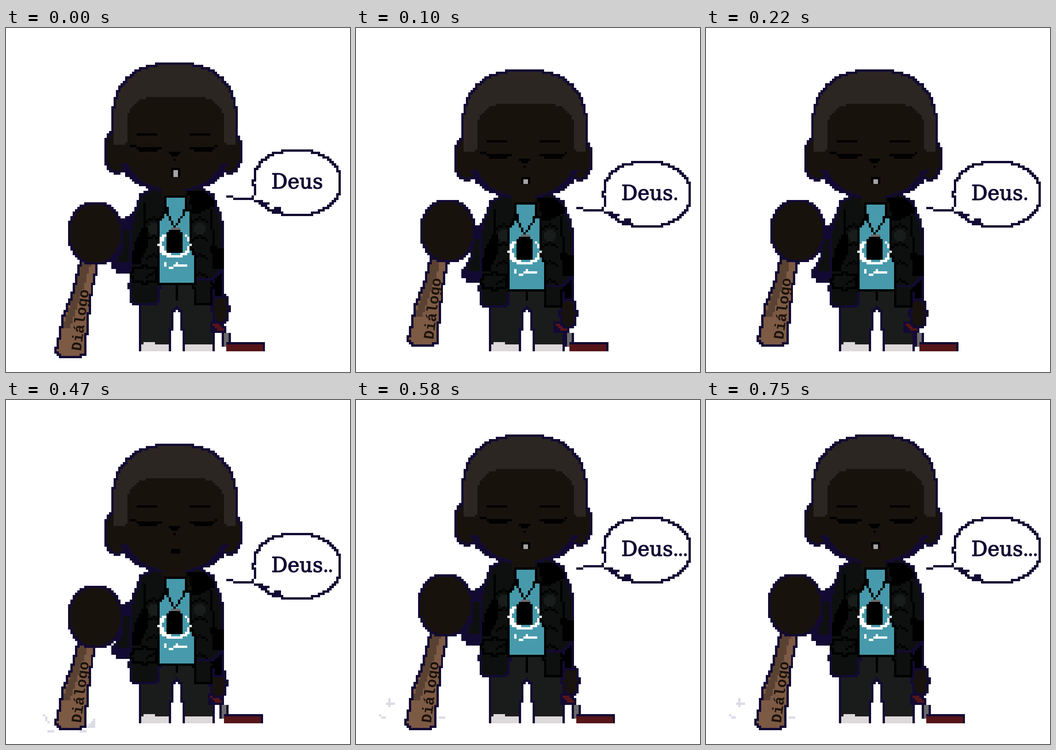
An HTML page with a canvas for the animation above (0.86 s loop, 748 px wide and 748 px high).

```html
<!DOCTYPE html>
<html lang="pt">
<head>
<meta charset="utf-8">
<title>Deus...</title>
<style>
  html, body { margin: 0; width: 100%; height: 100%; overflow: hidden; background: #fff; }
  canvas, svg { position: absolute; left: 0; top: 0; width: 100%; height: 100%; }
  canvas { image-rendering: pixelated; }
  #speech { font: 44px "DejaVu Serif", "Noto Serif", serif; fill: #130a33; stroke: #130a33; stroke-width: 1.4px; }
  #dots { font: 42px "Liberation Serif", serif; }
  #carving { font: bold 32px "Liberation Mono", monospace; fill: #1c130d; }
</style>
</head>
<body>
<canvas width="150" height="150"></canvas>
<svg viewBox="0 0 748 748">
  <text id="carving">Diálogo</text>
  <text id="speech" x="577">Deus<tspan id="dots" x="690"></tspan></text>
</svg>
<script>
const ctx = document.querySelector('canvas').getContext('2d');
const [carving, speech, dots] = ['carving', 'speech', 'dots'].map(id => document.getElementById(id));

const NAVY = '#130a33', SKIN = '#18120d', HAIR = '#2c2622', COAT = '#0d100f', BLACK = '#000',
  TEAL = '#479aab', CLOTH = '#1a1c1c', SHOE = '#ddd8da', WOOD = '#7d5a44', SHADE = '#5a4233',
  RED = '#561519', GREY = '#6b6a6c', SPLASH = '#dcdce8', GLEAM = '#181c1b', WHITE = '#fff';

// Offsets from the rest pose, in art pixels on a 150 x 150 grid.
const rest = { head: 0, brow: 0, face: 0, body: 0, hem: 0, arm: 0, fist: [0, 0], bat: [0, 0],
  hand: [0, 0], blade: 0, bubble: 0, tail: 0 };
const poses = [
  { ...rest, until: 100, lips: 61, teeth: 3 },
  { ...rest, until: 300, lips: 65, teeth: 2, head: 3, brow: 3, face: 3, body: 3, hem: 1, arm: 4,
    fist: [1, -1], bat: [1, -5], hand: [-1, 2], blade: -3, bubble: 5, tail: 5 },
  { ...rest, until: 580, lips: 65, teeth: 0, head: 4, face: 1, body: 4, hem: 3, arm: 6,
    fist: [0, 5], hand: [-1, 1], blade: -1, bubble: 5, tail: 5 },
  { ...rest, until: 860, lips: 62, teeth: 2, bubble: -2 }
];

const move = (x, y) => ctx.setTransform(1, 0, 0, 1, x, y);

function box(color, x, y, w, h = 1) {
  ctx.fillStyle = color;
  ctx.fillRect(x, y, w, h);
}

// Fills rows of [y, from, to], with an optional one-pixel outline around them.
function fillRows(rows, fill, edge) {
  if (edge) for (const [y, a, b] of rows) box(edge, a - 1, y - 1, b - a + 3, 3);
  for (const [y, a, b] of rows) box(fill, a, y, b - a + 1);
}

// Superellipse; n = 2 is round, larger n is squarer.
function oval(fill, edge, cx, cy, rx, ry, n = 2, top = 0, bottom = 150) {
  const rows = [];
  for (let y = Math.max(top, Math.ceil(cy - ry)); y <= Math.min(bottom, cy + ry); y++) {
    const w = rx * (1 - Math.abs((y - cy) / ry) ** n) ** (1 / n);
    rows.push([y, Math.ceil(cx - w), Math.floor(cx + w)]);
  }
  fillRows(rows.filter(r => r[2] >= r[1]), fill, edge);
}

function parse(text) {
  return text.split(', ').map(pair => pair.split(' ').map(Number));
}

function poly(fill, edge, p) {
  if (typeof p == 'string') p = parse(p);
  const ys = p.map(q => q[1]), rows = [];
  for (let y = Math.min(...ys); y < Math.max(...ys); y++) {
    const cuts = [];
    p.forEach(([a, b], i) => {
      const [c, d] = p[(i + 1) % p.length];
      if ((b <= y) != (d <= y)) cuts.push(a + (y - b) * (c - a) / (d - b));
    });
    cuts.sort((m, n) => m - n);
    for (let i = 0; i < cuts.length; i += 2) rows.push([y, Math.ceil(cuts[i]), Math.floor(cuts[i + 1])]);
  }
  fillRows(rows, fill, edge);
}

// Polygon given by its right half, as offsets from the axis cx.
function mirrored(fill, edge, cx, text) {
  const half = parse(text);
  poly(fill, edge, [...half.map(([x, y]) => [cx + x, y]), ...half.reverse().map(([x, y]) => [cx - x, y])]);
}

function line(color, text) {
  parse(text).reduce(([x, y], [u, v]) => {
    const n = Math.max(Math.abs(u - x), Math.abs(v - y));
    for (let i = 0; i <= n; i++) box(color, Math.round(x + (u - x) * i / n), Math.round(y + (v - y) * i / n), 1);
    return [u, v];
  });
}

function legs() {
  move(0, 0);
  mirrored(CLOTH, NAVY, 74, '0 108, 15 108, 15 141, 4 141, 3 130, 2 122, 0 120');
  box(BLACK, 74, 111, 1, 8);
  for (const x of [59, 78]) box(SHOE, x, 138, 12, 3);
  box(SHOE, 60, 137, 5);
  box(WHITE, 50, 141, 50);
}

function weapon(p) {
  move(p.blade, 0);
  box(NAVY, 89, 128, 3, 5);
  poly(RED, NAVY, '90 129, 92 129, 95 132, 92 132');
  box(NAVY, 94, 133, 4, 6);
  box(GREY, 95, 133, 2, 6);
  box(NAVY, 96, 137, 17, 4);
  box(RED, 96, 138, 16, 3);
  move(...p.hand);
  oval(SKIN, NAVY, 93, 122, 3, 5.5);
}

function coat(p) {
  move(0, p.hem);
  poly(BLACK, NAVY, '89 100, 93 100, 93 117, 91 117');
  oval(COAT, NAVY, 60, 112, 6, 7.5, 5);
  oval(COAT, BLACK, 85.5, 112, 3.5, 8, 5);

  move(0, p.arm);
  poly(COAT, NAVY, '57 82, 51 84, 50 97, 47 103, 55 105, 58 103');
  poly(NAVY, NAVY, '47 102, 55 103, 55 106, 49 105');
  poly(NAVY, NAVY, '51 84, 55 82, 54 85, 51 87');

  move(0, p.body);
  mirrored(COAT, NAVY, 74, '0 70, 10 70, 15 73, 18 81, 19 85, 19 104, 15 109, 0 109');
  oval(COAT, BLACK, 60, 107, 5, 3, 3);
  poly(BLACK, BLACK, '60 88, 60 94, 57 101, 55 102, 57 94');
  poly(BLACK, BLACK, '80 71, 85 72, 89 76, 82 80');
  poly(BLACK, BLACK, '90 96, 93 97, 93 104, 91 104');
  // Quilted seams on both sides.
  for (const x of [64, 84])
    for (let y = 83; y < 109; y += 8) {
      if (y < 90) oval(GLEAM, null, x, y + 4, 2.5, 2.5);
      line(BLACK, `${x - 3} ${y + 1}, ${x} ${y - 1}, ${x + 3} ${y + 1}`);
    }
  line(BLACK, '60 76, 60 88');
  line(BLACK, '89 79, 90 96');
}

function shirt(p) {
  move(0, p.body);
  box(SKIN, 68, 67, 10, 7);
  poly(TEAL, BLACK, '70 74, 77 74, 77 80, 79 80, 80 97, 81 99, 81 111, 67 111, 67 84, 70 79');
  line(BLACK, '69 75, 70 81, 73 86, 77 81, 78 75');
  oval(WHITE, null, 73, 94, 7, 5.7, 2.2);
  oval(TEAL, null, 73.5, 93.5, 5.6, 4.8, 2.2);
  box(GREY, 72, 87, 4);
  box(BLACK, 70, 89, 7, 9);
  box(BLACK, 71, 88, 5);
  box(WHITE, 69, 102, 1, 2);
  box(WHITE, 74, 103, 5);
  line(WHITE, '71 104, 72 104, 74 102');
}

function head(p) {
  const skull = (fill, edge, top, bottom) => oval(fill, edge, 73, 42.5, 26.5, 27, 2.5, top, bottom);
  move(0, p.head);
  skull(NAVY, NAVY);
  oval(SKIN, NAVY, 48, 53.5, 5, 8.5);
  oval(SKIN, NAVY, 97, 53.5, 4.5, 8.5);
  skull(HAIR, null, 0, 50);
  skull(SKIN, null, 51, 58);
  skull(NAVY, null, 59);
  oval(SKIN, null, 73.5, 50, 21.5, 20.7, 4, 0, 58);
  oval(SKIN, null, 73, 50, 22, 19.7, 2.3, 57);
  box(SKIN, 68, 69, 10, 2);

  move(0, p.brow);
  for (const x of [57, 80]) box(BLACK, x, 46, 9);
  move(0, p.face);
  line(BLACK, '54 51, 56 51, 57 52, 67 52');
  line(BLACK, '80 52, 90 52, 91 51');
  for (const x of [58, 82]) box(BLACK, x, 53, 8);
  box(BLACK, 71, 54, 5);
  box(BLACK, 72, 55, 3);
  box(BLACK, 73, 57, 1);
  move(0, 0);
  box(BLACK, 72, p.lips, 4, p.teeth + (p.teeth ? 1 : 2));
  box('#a5a3a3', 73, p.lips + 1, 2, p.teeth);
}

function bat(p) {
  const [x, y] = p.bat;
  move(x, y);
  poly(WOOD, NAVY, '33 100, 38 100, 38 106, 36 115, 33 141, 30 143, 24 143, 22 140, 25 126, 29 116');
  poly(SHADE, null, '33 100, 36 103, 34 110, 27 131, 24 131, 29 116');
  carving.setAttribute('transform', `translate(${163 + 5 * x} ${703 + 5 * y}) rotate(-82.7)`);
  move(...p.fist);
  oval(SKIN, NAVY, 38.5, 89, 11, 12.5, 2.2);
}

function splash(k) {
  move(0, 0);
  if (k == 2) {
    line(SPLASH, '16 137, 18 140');
    for (const x of [18, 32]) box(SPLASH, x, 144, 3);
    poly(SPLASH, null, '38 139, 38 142, 36 143, 35 142');
  }
  if (k == 3) {
    box(SPLASH, 14, 130, 1, 4);
    box(SPLASH, 13, 132, 4);
    line(SPLASH, '10 137, 12 138');
    box(SPLASH, 36, 138, 3);
  }
}

function bubble(p) {
  move(0, p.bubble);
  oval(WHITE, NAVY, 126.3, 67, 18.3, 13.5, 2.2);
  poly(WHITE, null, '109 70, 106 74, 112 76, 114 75');
  line(NAVY, '108 70, 108 72, 106 74, 110 75, 114 76');
  box(NAVY, 117, 78, 3, 2);
  move(0, p.tail);
  const end = p.bubble < p.tail ? 72 : 74;
  line(NAVY, `96 73, 98 73, 99 ${end}, 106 ${end}`);
}

let shown = -1;
function draw(now) {
  const t = now % 860, k = poses.findIndex(q => t < q.until), p = poses[k];
  if (k == shown) return;
  shown = k;
  move(0, 0);
  box(WHITE, 0, 0, 150, 150);
  legs();
  weapon(p);
  coat(p);
  shirt(p);
  head(p);
  bat(p);
  splash(k);
  bubble(p);
  speech.setAttribute('y', 349 + 5 * p.bubble);
  dots.textContent = '.'.repeat(k);
}

let start;
function tick(now) {
  start ??= now;
  draw(now - start);
  requestAnimationFrame(tick);
}
draw(0);
requestAnimationFrame(tick);
</script>
</body>
</html>
```
